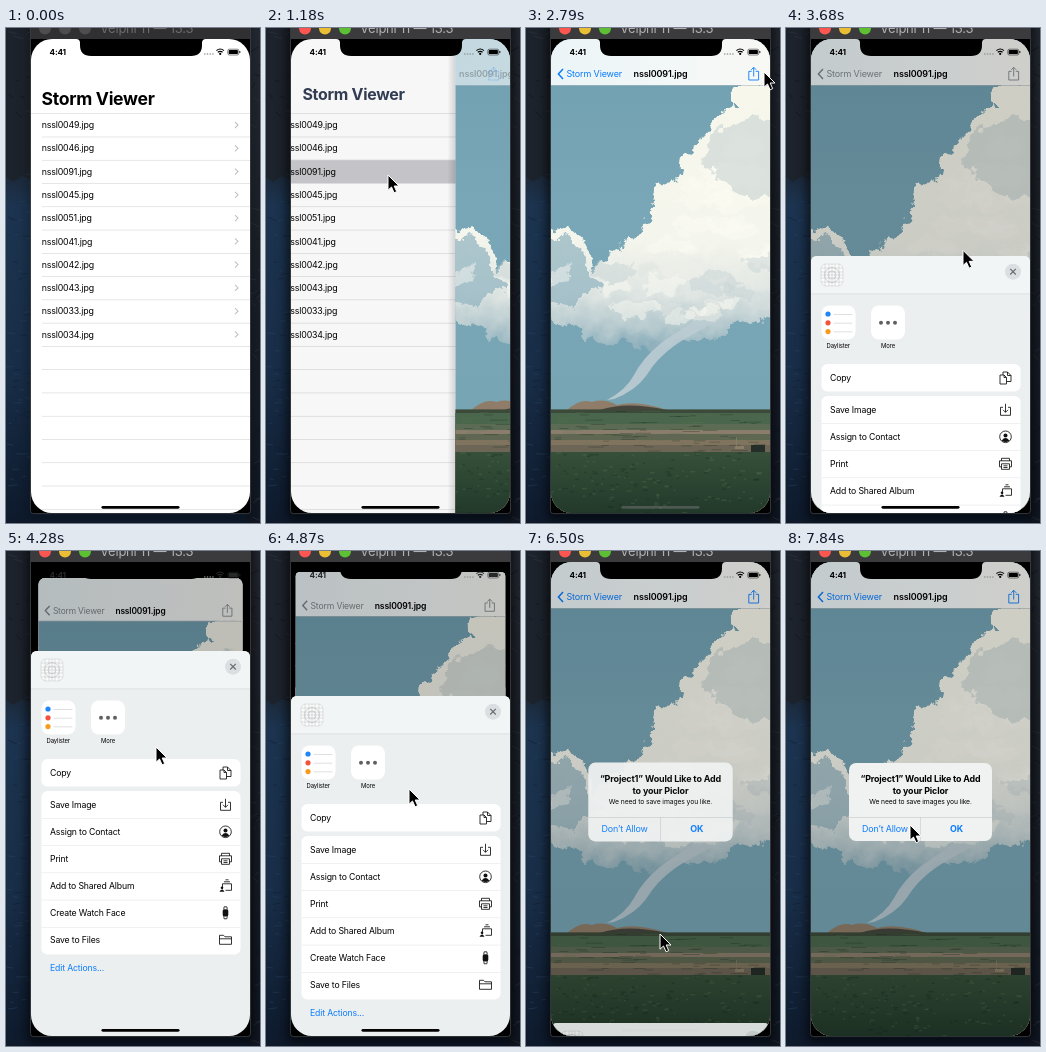
Write an HTML page that moves like this. It is 254 by 495 pixels and loops after 7990 ms.

```html
<!DOCTYPE html>
<html lang="en">
<head>
<meta charset="utf-8">
<title>Storm Viewer</title>
<style>
html, body { margin: 0; width: 100%; height: 100%; overflow: hidden; background: #101a28; }
svg { display: block; width: 254px; height: 495px; }
text { font-family: Inter, Roboto, sans-serif; white-space: pre; }
</style>
</head>
<body>
<svg id="stage" viewBox="0 0 254 495" xmlns="http://www.w3.org/2000/svg"></svg>
<script>
const LOOP = 7990, STEP = 148, REST = 228;
const BLUE = '#0a7cff';
const $ = id => document.getElementById(id);

let seed = 11;
const rnd = () => (seed = (seed * 16807) % 2147483647) / 2147483647;

const text = (x, y, size, str, extra = '') =>
  `<text x="${x}" y="${y}" font-size="${size}" letter-spacing="${(-size * 0.017).toFixed(2)}" ${extra}>${str}</text>`;
const rect = (x, y, w, h, fill, extra = '') =>
  `<rect x="${x}" y="${y}" width="${w}" height="${h}" fill="${fill}" ${extra}/>`;
const dot = (x, y, r, fill, extra = '') => `<circle cx="${x}" cy="${y}" r="${r}" fill="${fill}" ${extra}/>`;
const line = (d, stroke, w = 1, extra = '') =>
  `<path d="${d}" fill="none" stroke="${stroke}" stroke-width="${w}" ${extra}/>`;
const mid = 'text-anchor="middle"';
const bold = 'font-weight="700"';
const semi = 'font-weight="600"';

function wallpaper() {
  let s = rect(0, 0, 254, 495, 'url(#sea)') + rect(240, 0, 14, 495, 'url(#cliff)');
  s += '<path d="M0 0H27V152L16 148 7 154 0 149Z" fill="#1d232c"/>';
  for (let i = 0; i < 110; i++) {
    const right = i % 3 === 0, y = rnd() * 495, x = right ? 244 + rnd() * 10 : rnd() * 25;
    const rock = right || y < 145;
    s += line(`M${x.toFixed(1)} ${y.toFixed(1)}l${(3 + rnd() * 6).toFixed(1)} ${((rnd() - 0.5) * (rock ? 12 : 3)).toFixed(1)}`,
      rock ? (i % 2 ? '#343a43' : '#0d1219') : (i % 2 ? '#27435f' : '#122033'), 1, 'opacity=".55"');
  }
  return s;
}

function list() {
  const ids = ['49', '46', '91', '45', '51', '41', '42', '43', '33', '34'];
  let s = rect(25, 11, 300, 480, '#fff') + rect(25, 131.8, 300, 23.3, '#c9c9ce', 'id="picked"');
  for (let i = 0; i < 18; i++) {
    const y = 85.4 + i * 23.27;
    s += rect(i ? 36 : 25, y.toFixed(2), 280, 0.6, '#d6d6d8');
    if (i < 10) {
      s += text(35.7, (y + 14.8).toFixed(2), 8.8, `nssl00${ids[i]}.jpg`);
      s += line(`M229 ${y + 8.6}l3 3-3 3`, '#c2c2c6', 1.1);
    }
  }
  return s;
}

function clouds() {
  let s = `<path fill="url(#cloud)" d="M250 50H200L203 72 184 84 172 106 151 123 149 143 125 152 118 182 100 206 78 222 64 240
    58 222 46 203 32 195 12 200V284L40 296 62 308 92 311 122 318 150 304 186 307 205 294 250 280Z"/>`;
  const tints = ['#fbfbf2', '#dfe4e1', '#c3d0d3', '#eff0e8'];
  for (let i = 0; i < 46; i++) {
    const y = 105 + rnd() * 190, low = y > 225;
    const left = low ? 70 : 212 - (y - 80) * 0.7;
    const x = left + rnd() * (240 - left), r = 5 + rnd() * 12;
    s += `<ellipse cx="${x.toFixed(1)}" cy="${y.toFixed(1)}" rx="${(r * 1.5).toFixed(1)}" ry="${(r * 0.6).toFixed(1)}" fill="${tints[low ? i % 4 : 0]}" opacity=".45"/>`;
  }
  s += '<path d="M14 208Q32 200 42 212T58 242L70 256Q54 258 44 276L14 268Z" fill="#8fb2bf" opacity=".7"/>';
  s += '<path d="M14 240Q30 226 40 232L34 250Q22 252 14 264Z" fill="#dbe4e4" opacity=".8"/>';
  s += '<path d="M170 130q4-34 34-40t40 0v72q-22 10-40-4t-34-28Z" fill="#c9d4d3" opacity=".6"/>';
  return `<g filter="url(#rough)" transform="translate(6 4)">${s}</g>`;
}

function photo() {
  let s = rect(25, 11, 219, 474, 'url(#sky)') + clouds();
  s += '<path d="M190 294Q162 308 148 318 131 330 120 348 109 363 88 371L81 372Q100 362 108 347 116 331 134 316 150 304 170 292Z" fill="#bccdd3" opacity=".9"/>';
  s += '<path d="M40 383Q54 370 66 374 78 370 91 377 112 372 141 382Z" fill="#8f7d69"/><path d="M74 382Q100 373 141 382Z" fill="#46463e"/>';
  const bands = [[381.4, '#3c4a39'], [385, '#4a664c'], [396, '#5c6b54'], [402, '#8a7d6c'], [406, '#5f6752'], [412, '#81745f'], [417, '#6d6555'], [424, 'url(#grass)']];
  bands.forEach(([y, c]) => s += rect(25, y, 219, 486 - y, c));
  for (let i = 0; i < 260; i++) {
    const y = 383 + rnd() * 102, near = y > 424;
    s += rect((22 + rnd() * 215).toFixed(1), y.toFixed(1), (near ? 1.5 + rnd() * 4 : 5 + rnd() * 14).toFixed(1), near ? 1.4 : 0.8,
      i % 2 ? '#15291c' : '#56724f', 'opacity=".35"');
  }
  s += rect(225, 417, 14, 7, '#252e28') + rect(209, 418, 9, 3, '#8a7e69') + rect(210, 409, 0.8, 12, '#8a7e69');
  return `<g clip-path="url(#photoClip)">${s}</g>`;
}

const shareIcon = line('M225.7 43.3H222.8V52H232.6V43.3H229.7M227.7 48.5V39.5M225.2 41.8L227.7 39.3 230.2 41.8', 'currentColor', 0.9);

function detail() {
  return rect(17, 11, 8, 474, 'url(#edge)', 'id="edge"') + photo() +
    rect(25, 11, 219, 46, 'url(#glass)', 'id="bar"') + rect(25, 57, 219, 0.6, '#aebabd');
}

function navItems() {
  return `<g id="nav"><g id="back">${line('M37 41l-4.6 5 4.6 5', 'currentColor', 1.5)}${text(40.5, 49.2, 9, 'Storm Viewer', 'fill="currentColor"')}</g>
    <g id="name">${text(134.5, 49.2, 9, 'nssl0091.jpg', mid + semi)}</g><g id="share">${shareIcon}</g></g>`;
}

// Row icons, each drawn around 0,0
const icons = {
  copy: 'M-5.5-3V6H1V-.5L-1.5-3ZM-2.5-3V-6H2L5.5-2.5V3.5H1M2-6V-2.5H5.5M-1.5-3V-.5H1',
  save: 'M-2.5-2.5H-5V5.5H5V-2.5H2.5M0-6V2.5M-2.5 0L0 2.5 2.5 0',
  person: 'M-5.8 0a5.8 5.8 0 1 0 11.6 0a5.8 5.8 0 1 0-11.6 0',
  print: 'M-4-3V-5.5H4V-3M-4 3H-6V-3H6V3H4M-4 0H4V5.5H-4ZM-2 2H2M-2 3.7H2',
  album: 'M-3-2V3.5M-3-2H6V4.5H0M-1.5-4H4.5M0-6H3',
  watch: 'M-1.8-3.5L-1.3-6H1.3L1.8-3.5M-1.8 3.5L-1.3 6H1.3L1.8 3.5',
  folder: 'M-6 4.5V-4.5H-2L-.5-3H6V4.5ZM-6-1H6'
};
const solid = {
  person: dot(0, -1.4, 2, '#111') + '<path d="M-3.8 3.6Q0-1 3.8 3.6 0 6.8-3.8 3.6Z" fill="#111"/>',
  album: dot(-3.5, 2, 1.3, '#111') + '<path d="M-6 6Q-3.5 1.5-1 6Z" fill="#111"/>',
  watch: rect(-2.8, -3.6, 5.6, 7.2, '#111', 'rx="1.6"')
};
const row = (y, label, icon) => text(44, y + 3.2, 8.7, label) +
  `<g transform="translate(219.5 ${y})">${line(icons[icon], '#111', 0.85, 'stroke-linejoin="round"')}${solid[icon] || ''}</g>`;

function sheet() {
  let s = rect(25, 0, 219, 520, '#eceff0', 'rx="6"') + '<path d="M25 38V6q0-6 6-6H238q6 0 6 6V38Z" fill="#f2f5f5"/>' + rect(25, 37.6, 219, 0.6, '#d0d4d5');
  s += rect(35, 8, 22, 22, '#fafafa', 'rx="5" stroke="#c6caca" stroke-width=".5"');
  s += line('M39 8V30M43 8V30M46 8V30M49 8V30M53 8V30M35 12H57M35 16H57M35 19H57M35 22H57M35 26H57', '#bcc1c1', 0.45);
  s += dot(46, 19, 7.5, 'none', 'stroke="#aeb4b4" stroke-width=".5"') + dot(46, 19, 4, 'none', 'stroke="#aeb4b4" stroke-width=".5"');
  s += dot(227, 15.7, 8, '#dcdfe1') + line('M224.2 12.9l5.6 5.6M229.8 12.9l-5.6 5.6', '#6d7174', 1.3);
  s += rect(35.5, 49.5, 34, 34, '#fff', 'rx="8"') + rect(85, 49.5, 34, 34, '#fff', 'rx="8"');
  ['#1f86f5', '#f4523d', '#f79b1e'].forEach((c, i) => {
    const y = 58 + i * 8.8;
    s += dot(42, y, 2.6, c) + rect(47.5, y, 19, 0.6, '#cbcbcb') + dot(95 + i * 7, 66.7, 2, '#616161');
  });
  s += text(52.3, 91.6, 5.9, 'Daylister', mid) + text(102, 91.6, 5.9, 'More', mid);
  s += rect(35.5, 108, 199, 27.5, '#fff', 'rx="6"') + rect(35.5, 140, 199, 163.5, '#fff', 'rx="6"');
  s += row(122, 'Copy', 'copy');
  [['Save Image', 'save'], ['Assign to Contact', 'person'], ['Print', 'print'], ['Add to Shared Album', 'album'], ['Create Watch Face', 'watch'], ['Save to Files', 'folder']]
    .forEach(([label, icon], i) => {
      s += row(153.8 + i * 27, label, icon);
      if (i) s += rect(35.5, 140 + i * 27.2, 199, 0.5, '#dfe2e3');
    });
  return s + text(44, 320, 8.7, 'Edit Actions...', `fill="${BLUE}"`);
}

function alertBox() {
  return rect(63, 212, 143, 78, '#f0f2f2', 'rx="7"') +
    text(134.5, 231, 8.9, '“Project1” Would Like to Add', mid + bold) + text(134.5, 242.6, 8.9, 'to your Piclor', mid + bold) +
    text(134.5, 253.4, 6.75, 'We need to save images you like.', mid) +
    rect(63, 266, 143, 0.6, '#c4c9ca') + rect(134.3, 266, 0.6, 24, '#c4c9ca') +
    text(99, 281.2, 8.9, 'Don’t Allow', mid + ` fill="${BLUE}"`) + text(170.5, 281.2, 8.9, 'OK', mid + bold + ` fill="${BLUE}"`);
}

function statusBar() {
  let s = text(43.5, 27, 8.2, '4:41', bold);
  for (let i = 0; i < 4; i++) s += dot(198.8 + i * 2.7, 26, 0.8, '#8b8f91');
  s += line('M210.4 22.6Q214.2 19.4 218 22.6M211.8 24.3Q214.2 22.3 216.6 24.3', 'currentColor', 1.2) + dot(214.2, 25.9, 1.1, 'currentColor');
  s += rect(221.8, 21.2, 11, 5.8, 'none', 'rx="1.6" stroke="currentColor" stroke-width=".5"') + rect(222.7, 22.1, 9.2, 4, 'currentColor', 'rx=".9"') + rect(233.4, 23, 0.9, 2, 'currentColor');
  return s;
}

const stops = (id, vertical, list) => `<linearGradient id="${id}" x1="0" y1="0" x2="${vertical ? 0 : 1}" y2="${vertical ? 1 : 0}">` +
  list.map(([o, c, a = 1]) => `<stop offset="${o}" stop-color="${c}" stop-opacity="${a}"/>`).join('') + '</linearGradient>';

$('stage').innerHTML = `<defs>
  ${stops('sea', true, [[0, '#222831'], [0.3, '#1c2a3b'], [0.36, '#1c3450'], [0.7, '#182d47'], [1, '#0e1a2c']])}
  ${stops('cliff', true, [[0, '#252a33'], [0.4, '#1c2129'], [0.7, '#171d27'], [1, '#111824']])}
  ${stops('sky', true, [[0, '#6f9fb1'], [0.35, '#7aa7b7'], [0.78, '#78a5b4']])}
  ${stops('cloud', true, [[0, '#f7f7ec'], [0.6, '#f4f5ec'], [0.78, '#e0e6e3'], [0.92, '#b4c8cd'], [1, '#8fb0bc', 0.7]])}
  ${stops('grass', true, [[0, '#36503a'], [1, '#22392a']])}
  ${stops('glass', false, [[0, '#eef6f8'], [0.55, '#f5f9f9'], [1, '#fbfaf5']])}
  ${stops('edge', false, [[0, '#000', 0], [1, '#000', 0.14]])}
  <filter id="rough" x="-10%" y="-10%" width="120%" height="120%"><feTurbulence type="fractalNoise" baseFrequency=".07" numOctaves="4" seed="4"/><feDisplacementMap in="SourceGraphic" scale="20" xChannelSelector="R" yChannelSelector="G"/><feGaussianBlur stdDeviation=".6"/></filter>
  <filter id="soft" x="-30%" y="-20%" width="160%" height="140%"><feGaussianBlur stdDeviation="6"/></filter>
  <clipPath id="screen"><rect x="25" y="11" width="219" height="474" rx="21"/></clipPath>
  <clipPath id="photoClip"><rect x="25" y="11" width="219" height="474"/></clipPath>
  <clipPath id="cardClip"><rect id="cardEdge" x="25" y="11" width="219" height="474"/></clipPath>
</defs>
${wallpaper()}
${rect(21, -10, 227, 502, '#000', 'id="shadow" filter="url(#soft)"')}
${rect(24.5, -5, 220, 490.6, '#000', 'rx="3" stroke="#55585c" stroke-width=".6"')}
${rect(25, 0, 219, 11, '#303032', 'id="titlebar"')}
<g id="lights">${[39, 59, 79].map(x => dot(x, 0.5, 6, '#4d4d50')).join('')}</g>
${text(94, 5, 13, 'Velphi 11 — 13.3', 'id="caption"')}
<g clip-path="url(#screen)">
  <g id="card"><g clip-path="url(#cardClip)">
    <g id="list">${list()}</g>${rect(25, 11, 219, 474, '#000', 'id="listDim"')}
    <g id="big">${text(0, 0, 17.6, 'Storm Viewer', bold)}</g>
    <g id="detail">${detail()}</g>${navItems()}
    ${rect(25, 11, 219, 474, '#000', 'id="dim"')}
  </g></g>
  <g id="sheet">${sheet()}</g>
  <g id="alert">${alertBox()}</g>
</g>
<g id="status">${statusBar()}</g>
<path d="M70 11Q74 11 74 15V17Q74 28 85 28H185Q196 28 196 17V15Q196 11 200 11Z"/>
${rect(95.5, 478, 78, 2.7, '#000', 'id="home" rx="1.35"')}
<path id="cursor" d="M0 0V15.2L3.5 12 6.1 17.8 8.7 16.6 6.2 11H11Z" fill="#000" stroke="#fff" stroke-width="1" stroke-linejoin="round"/>`;

const clamp = v => Math.max(0, Math.min(1, v));

// Linear keyframes: [step, value, value...]
function track(keys, n) {
  const i = keys.findIndex(k => k[0] > n);
  if (i === 0) return keys[0].slice(1);
  if (i < 0) return keys[keys.length - 1].slice(1);
  const a = keys[i - 1], b = keys[i], u = (n - a[0]) / (b[0] - a[0]);
  return a.slice(1).map((v, j) => v + (b[j + 1] - v) * u);
}

const PUSH = [[7, 0], [8, 0.25], [9, 0.74], [10, 0.94], [11, 1]];
const SHEET = [[22, 500], [23, 410], [24, 270], [25, REST], [27, REST], [28, 165], [29, 100], [30, 68], [31, 56], [32, 88], [33, 145], [34, 200], [35, REST], [42, REST], [43, 350], [44, 472], [45, 500]];
const DIM = [[22, 0], [23, 0.07], [24, 0.15], [25, 0.17]];
const ALERT = [[42, 0, 1.15], [43, 0.45, 1.08], [44, 0.94, 1.01], [45, 1, 1]];
const CURSOR = [[2, 238, 155], [4, 150, 149], [5, 122, 147], [8, 122, 147], [10, 112, 128], [13, 58, 50], [14, 46, 42],
  [15, 60, 40], [17, 165, 36], [18, 225, 38], [19, 238, 44], [21, 229, 44], [23, 227, 47], [26, 152, 310], [27, 150, 324], [29, 150, 196],
  [31, 148, 152], [33, 143, 238], [35, 138, 318], [36, 136, 321], [38, 133, 385], [40, 134, 383], [44, 134, 383], [47, 150, 345], [50, 166, 296],
  [51, 160, 268], [52, 130, 248], [53, 124, 274]];

const set = (id, attrs) => { for (const k in attrs) $(id).setAttribute(k, attrs[k]); };

function draw(n) {
  const active = n >= 7, [p] = track(PUSH, n), [top] = track(SHEET, n), [fade, size] = track(ALERT, n);
  const q = Math.pow(p, 1.2), sharing = n >= 23 && n < 43;

  set('titlebar', { fill: active ? '#3b3b3d' : '#303032' });
  set('caption', { fill: active ? '#b1b1b4' : '#6b6b6e' });
  set('shadow', { opacity: active ? 0.65 : 0.25 });
  [...$('lights').children].forEach((c, i) => c.setAttribute('fill', active ? ['#fc5650', '#e9bd34', '#5dbf33'][i] : '#4d4d50'));

  set('picked', { opacity: active ? 1 : 0 });
  set('list', { transform: `translate(${-65.7 * p} 0)` });
  set('listDim', { opacity: 0.12 * p });
  set('big', {
    transform: `translate(${35.5 + 5 * q} ${77 - 28 * q}) scale(${1 - 0.5 * q})`,
    fill: p ? `rgb(${Math.round(35 + 80 * q)},${Math.round(45 + 77 * q)},${Math.round(55 + 150 * q)})` : '#000',
    opacity: clamp((1 - p) * 4)
  });
  set('detail', { transform: `translate(${219 * (1 - p)} 0)`, visibility: p ? 'visible' : 'hidden' });
  set('bar', { opacity: 0.55 + 0.43 * p });
  set('edge', { opacity: 1 - p });
  set('nav', { color: sharing ? '#7f878c' : BLUE, visibility: p ? 'visible' : 'hidden' });
  set('back', { opacity: clamp(p * 2.5 - 1.5) });
  set('name', { transform: `translate(${114 * (1 - p)} 0)`, opacity: p });
  set('share', { opacity: p });

  const lift = clamp((REST - top) / 128), e = lift * (1 - 0.1 * (1 - lift));
  set('card', { transform: `translate(${134.5 * 0.068 * e} ${16 * e + 11 * 0.068 * e}) scale(${1 - 0.068 * e})` });
  set('cardEdge', { rx: 7 * e });
  set('dim', { opacity: track(DIM, n)[0] + 0.06 * e });
  set('status', { color: e > 0.4 ? '#26282a' : '#000', fill: e > 0.4 ? '#26282a' : '#000' });
  set('sheet', { transform: `translate(0 ${top})`, visibility: top < 490 ? 'visible' : 'hidden', opacity: n > 42 ? 0.88 : 1 });
  set('alert', { opacity: fade, transform: `translate(134.5 251) scale(${size}) translate(-134.5 -251)` });

  const dark = p < 0.5 || sharing;
  set('home', { fill: dark ? '#000' : '#74797a', opacity: dark ? 1 : 0.5 * (1 - fade) });
  const [x, y] = track(CURSOR, n);
  set('cursor', { transform: `translate(${x} ${y})`, visibility: n >= 2 ? 'visible' : 'hidden' });
}

const start = performance.now();
let last = -1;
function tick() {
  const t = (performance.now() - start) % LOOP;
  const n = Math.min(53, Math.floor((t + 24) / STEP));
  if (n !== last) draw(last = n);
  requestAnimationFrame(tick);
}
draw(0);
tick();
</script>
</body>
</html>
```
